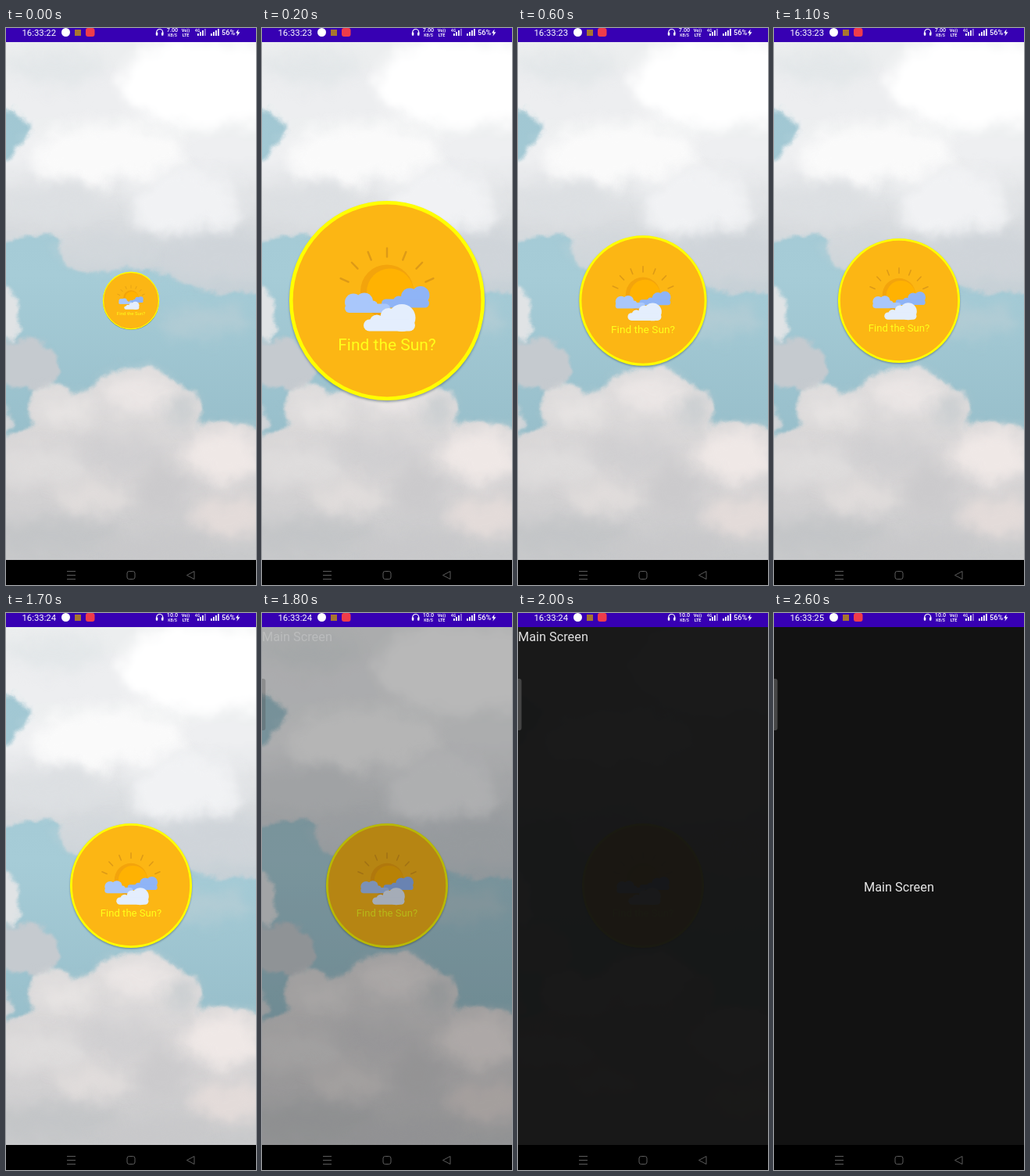
Write an HTML page that moves like this. It is 320 by 712 pixels and loops after 2900 ms.

```html
<!DOCTYPE html>
<html lang="en">
<head>
<meta charset="utf-8">
<title>Splash screen</title>
<style>
html, body { margin: 0; width: 100%; height: 100%; overflow: hidden; background: #000; }
svg { display: block; width: 320px; height: 712px; }
text { font-family: Roboto, sans-serif; }
</style>
</head>
<body>
<svg viewBox="0 0 320 712" xmlns="http://www.w3.org/2000/svg">
  <defs>
    <clipPath id="screen"><rect y="18" width="320" height="662"/></clipPath>
    <filter id="puff" filterUnits="userSpaceOnUse" x="-40" y="-20" width="400" height="740" color-interpolation-filters="sRGB">
      <feGaussianBlur stdDeviation="2.2" result="b"/>
      <feTurbulence type="fractalNoise" baseFrequency=".045" numOctaves="3" seed="4"/>
      <feDisplacementMap in="b" scale="16" xChannelSelector="R" yChannelSelector="G"/>
    </filter>
    <filter id="soft" filterUnits="userSpaceOnUse" x="-60" y="-40" width="440" height="780" color-interpolation-filters="sRGB">
      <feGaussianBlur stdDeviation="10" result="b"/>
      <feTurbulence type="fractalNoise" baseFrequency=".03" numOctaves="3" seed="9"/>
      <feDisplacementMap in="b" scale="26" xChannelSelector="R" yChannelSelector="G"/>
    </filter>
    <filter id="shade" x="-10%" y="-10%" width="120%" height="120%"><feGaussianBlur stdDeviation="1.5"/></filter>
    <linearGradient id="sky" x1="0" y1="0" x2="0" y2="1">
      <stop offset="0" stop-color="#9fc5d1"/>
      <stop offset=".45" stop-color="#a6ccd7"/>
      <stop offset=".75" stop-color="#98bfcb"/>
    </linearGradient>
    <linearGradient id="upper" x1="0" y1="0" x2="0" y2="1">
      <stop offset="0" stop-color="#eceeef"/>
      <stop offset=".5" stop-color="#eeeff1"/>
      <stop offset=".75" stop-color="#d9dcdf"/>
      <stop offset="1" stop-color="#c6d0d6"/>
    </linearGradient>
    <linearGradient id="lower" x1="0" y1="0" x2="0" y2="1">
      <stop offset="0" stop-color="#dfdddd"/>
      <stop offset=".5" stop-color="#d6d4d5"/>
      <stop offset="1" stop-color="#c4c6c8"/>
    </linearGradient>
  </defs>

  <rect y="18" width="320" height="662" fill="#121212"/>

  <g id="splash" clip-path="url(#screen)">
    <rect y="18" width="320" height="662" fill="url(#sky)"/>
    <g id="clouds"></g>
    <g id="badge">
      <ellipse cy="2" rx="125" ry="127.5" fill="#35505a" opacity=".5" filter="url(#shade)"/>
      <ellipse rx="122.8" ry="125.3" fill="#fcb614" stroke="#ff0" stroke-width="4.6"/>
      <g id="rays" stroke="#dd9a17" stroke-width="2.4" stroke-linecap="round"></g>
      <circle cy="-12" r="34" fill="#f3a40c"/>
      <circle cx="4" cy="-11" r="30" fill="#ffb202"/>
      <g fill="#8fb4f6">
        <circle cx="43" cy="-7" r="11.5"/><circle cx="29" cy="-5" r="11"/><circle cx="15" cy="1" r="7"/>
        <rect x="-7" y="-2" width="61" height="11" rx="5.5"/>
      </g>
      <g fill="#a9c7fb">
        <circle cx="-43" cy="2" r="11"/><circle cx="-29" cy="1" r="11"/><circle cx="-18" cy="6" r="6"/>
        <rect x="-54" y="4" width="58" height="11.5" rx="5.7"/>
      </g>
      <g fill="#e4eefd">
        <circle cx="19" cy="22" r="17.5"/><circle cx="2" cy="20" r="10.5"/><circle cx="-13" cy="27" r="9"/>
        <rect x="-30" y="24" width="66" height="15" rx="7.5"/>
      </g>
      <text y="64" font-size="21" text-anchor="middle" fill="#ffff1a">Find the Sun?</text>
    </g>
  </g>

  <g id="main">
    <rect x="-4" y="84" width="8.5" height="66" rx="3" fill="#464646"/>
    <text id="title" font-size="16.3" fill="#e6e6e6">Main Screen</text>
  </g>

  <rect width="320" height="18" fill="#3700b3"/>
  <g fill="#fff">
    <text id="clock" x="20.5" y="9.8" font-size="11.3"></text>
    <circle cx="76.5" cy="5.5" r="5.5"/>
    <rect x="88" y="2" width="8" height="8" fill="#a8752f"/>
    <rect x="102" y="0" width="11.5" height="11" rx="3" fill="#ef3c4a"/>
    <path d="M192.700 7V5.500a4 4 0 0 1 8 0V7" fill="none" stroke="#fff" stroke-width="1.2"/>
    <rect x="191.800" y="5.500" width="2.500" height="4.300" rx="1"/>
    <rect x="199" y="5.500" width="2.500" height="4.300" rx="1"/>
    <g text-anchor="middle" font-weight="500">
      <text id="speed" x="213" y="5.200" font-size="7.200"></text>
      <text x="213" y="10.700" font-size="5.200">KB/S</text>
      <text x="230" y="5.200" font-size="5.600" font-weight="700">Vo))</text>
      <text x="230" y="10.500" font-size="5.400" font-weight="700">LTE</text>
      <text x="245" y="4.800" font-size="5.200">4G</text>
    </g>
    <g id="bars"></g>
    <text x="276" y="9.300" font-size="9.200" font-weight="500">56%</text>
    <path d="M297.500 1.500L294 6.600H296.300L295.500 10.500L299.500 5.200H297Z"/>
  </g>

  <rect y="680" width="320" height="32" fill="#000"/>
  <g fill="none" stroke="#5c5c5c" stroke-width="1">
    <path d="M78 694.500H89M78 699.500H89M78 704.500H89"/>
    <rect x="155" y="694.500" width="10" height="10" rx="2.500"/>
    <path d="M241 694.500V704.500L231.500 699.500Z" stroke-linejoin="round"/>
  </g>
</svg>
<script>
const LOOP = 2900, STEP = 100;
const $ = id => document.getElementById(id);

function add(parent, tag, attrs) {
  const el = document.createElementNS('http://www.w3.org/2000/svg', tag);
  for (const k in attrs) el.setAttribute(k, attrs[k]);
  $(parent).append(el);
}

const cloud = (d, fill, filter = 'puff', opacity = 1) =>
  add('clouds', 'path', { d, fill, opacity, filter: `url(#${filter})` });
const glow = (cx, cy, rx, ry, fill, opacity = 1) =>
  add('clouds', 'ellipse', { cx, cy, rx, ry, fill, opacity, filter: 'url(#soft)' });

// Upper bank
cloud('M-30 -10H350V335Q290 345 240 330Q180 300 150 308Q100 320 78 302Q64 285 70 270Q40 262 28 264Q10 276 -30 272V172Q8 170 16 150Q36 140 32 122Q14 104 -30 100Z', 'url(#upper)');
glow(255, 70, 110, 60, '#fff');
glow(60, 50, 60, 22, '#e3e7e9');
glow(130, 160, 100, 38, '#fafafa');
glow(230, 225, 70, 45, '#f1f2f4');
glow(60, 225, 65, 24, '#dcdfe2');
glow(270, 290, 80, 28, '#cfd4d9');
glow(130, 285, 55, 16, '#d2d7db');
glow(255, 375, 60, 18, '#b9ced5', .7);

// Left edge
cloud('M-30 322Q6 322 14 350Q24 380 8 398H-30Z', '#e0e3e5');
cloud('M-30 408Q24 390 48 402Q72 420 68 445Q50 470 30 462Q10 455 -30 460Z', '#c5cacf');
cloud('M-30 470Q2 476 8 505Q4 525 -30 525Z', '#d3d5d8');

// Lower bank
cloud('M-30 528Q20 520 38 508Q24 480 36 464Q62 448 82 466Q105 474 122 448Q150 430 190 438Q220 446 228 464Q252 462 254 488Q250 508 232 514Q262 498 288 506Q310 504 350 522V710H-30Z', 'url(#lower)');
glow(168, 466, 46, 22, '#ebe6e5');
glow(75, 490, 36, 20, '#e6e3e2');
glow(280, 548, 48, 34, '#efe8e6');
glow(225, 490, 20, 16, '#c6cccf', .8);
glow(135, 545, 70, 20, '#d0cfd1');
glow(50, 560, 60, 24, '#dedcdc');
glow(110, 600, 50, 20, '#e0dcdb');
glow(200, 590, 30, 34, '#cbcacc');
glow(285, 625, 50, 26, '#e3dbd9');
glow(60, 650, 80, 22, '#c3c5c7');
glow(190, 665, 70, 18, '#c8c8ca');

for (let i = -3; i <= 3; i++) {
  add('rays', 'path', { d: 'M0 -54V-65', transform: `translate(0 -2) rotate(${i * 22})` });
}
for (let i = 0; i < 4; i++) {
  const h = 3 + i * 2;
  add('bars', 'rect', { x: 245 + i * 3, y: 10 - h, width: 1.8, height: h, opacity: i < 3 ? 1 : .45 });
  add('bars', 'rect', { x: 262 + i * 3, y: 10 - h, width: 1.8, height: h });
}

function overshoot(u, tension) {
  const s = Math.min(u, 1) - 1;
  return s * s * ((tension + 1) * s + tension) + 1;
}

// cubic-bezier(.4, 0, .2, 1), solved by bisection
function fastOutSlowIn(x) {
  if (x <= 0) return 0;
  if (x >= 1) return 1;
  let lo = 0, hi = 1, s;
  for (let i = 0; i < 24; i++) {
    s = (lo + hi) / 2;
    const bx = 1.2 * s * (1 - s) ** 2 + .6 * s * s * (1 - s) + s ** 3;
    if (bx < x) lo = s; else hi = s;
  }
  return s * s * (3 - 2 * s);
}

function draw(ms) {
  const t = Math.floor((ms % LOOP) / STEP) * STEP;
  const scale = .624 * overshoot((t + 40) / 705, 6);
  $('badge').setAttribute('transform', `translate(160 348.5) scale(${scale})`);

  const fade = fastOutSlowIn((t - 1690) / 400);
  $('splash').setAttribute('opacity', 1 - fade);
  $('main').setAttribute('opacity', fade);

  const settled = t >= 2100;
  $('title').setAttribute('x', settled ? 115 : 0);
  $('title').setAttribute('y', settled ? 355.5 : 36);

  $('clock').textContent = '16:33:' + (22 + Math.floor((t + 850) / 1000));
  $('speed').textContent = t < 1150 ? '7.00' : '10.0';
}

let start;
function tick(now) {
  start ??= now;
  draw(now - start);
  requestAnimationFrame(tick);
}
draw(0);
requestAnimationFrame(tick);
</script>
</body>
</html>
```
